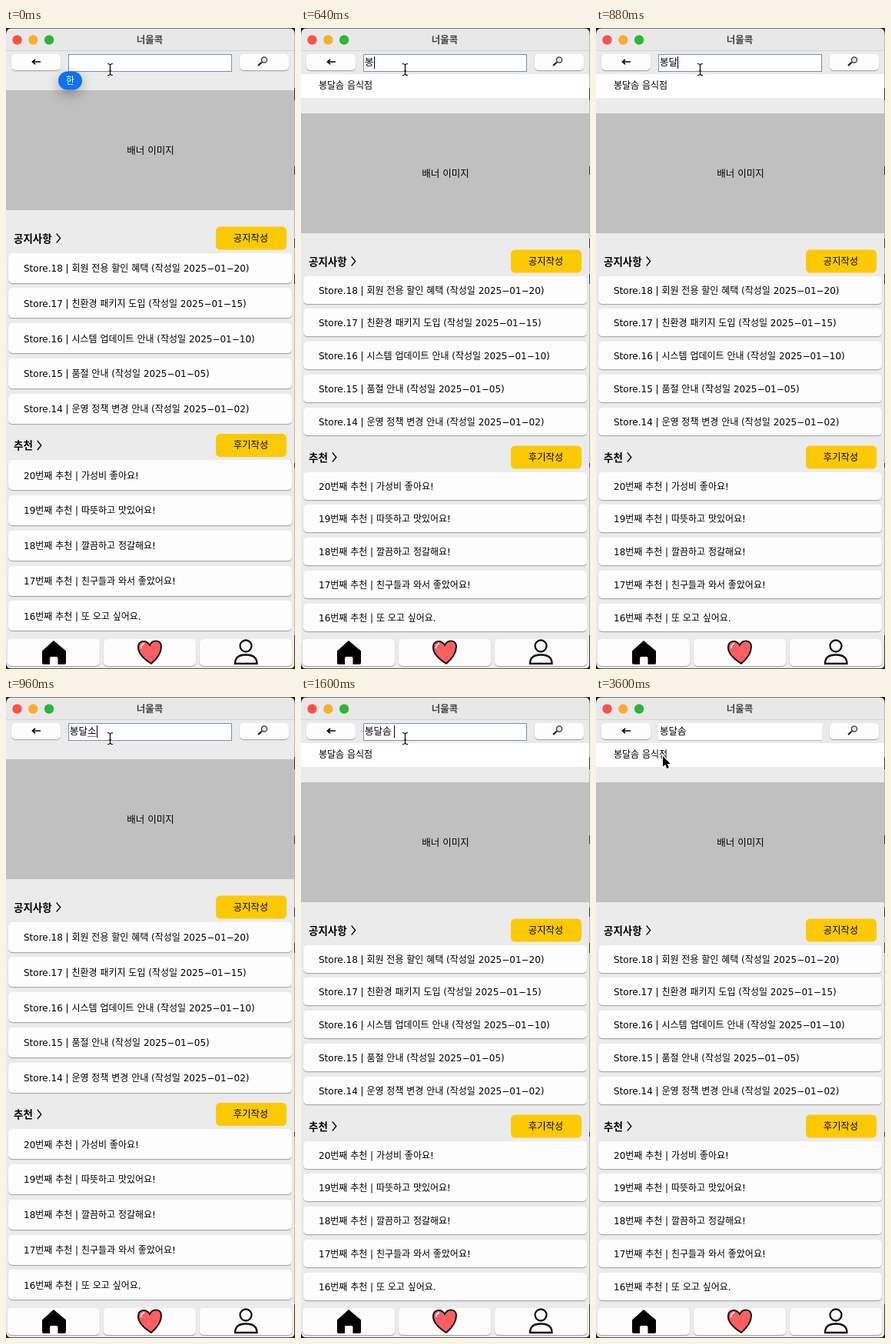
Write an HTML page with a canvas that moves like this. It is 376 px wide and 834 px high and loops after 3.68 s.

```html
<!DOCTYPE html>
<html lang="ko">
<head>
<meta charset="utf-8">
<title>너울콕</title>
<style>
  html, body { margin: 0; width: 100%; height: 100%; overflow: hidden; background: #ebebeb; }
  canvas { display: block; width: 376px; height: 834px; }
</style>
</head>
<body>
<canvas id="stage" width="376" height="834"></canvas>
<script>
const ctx = document.getElementById("stage").getContext("2d");
const W = 376, H = 834, LOOP = 3680, STEP = 80;
const FONT = '"DejaVu Sans", "Noto Sans CJK KR", "Noto Sans CJK", sans-serif';
const KOREAN = '"Noto Sans CJK KR", "Noto Sans CJK", sans-serif';

const VENUE = "봉달솜 음식점";
const KEYS = [
  [400, "ㅂ"], [480, "보"], [560, "봉"],
  [720, "봉ㄷ"], [800, "봉다"], [880, "봉달"],
  [960, "봉달소"], [1040, "봉달솜"], [1200, "봉달솜 "]
];
const NOTICES = [
  ["회원 전용 할인 혜택", 20], ["친환경 패키지 도입", 15], ["시스템 업데이트 안내", 10],
  ["품절 안내", 5], ["운영 정책 변경 안내", 2]
].map(([name, day], i) =>
  `Store.${18 - i} | ${name} (작성일 2025−01−${String(day).padStart(2, "0")})`);
const REVIEWS = ["가성비 좋아요!", "따뜻하고 맛있어요!", "깔끔하고 정갈해요!",
  "친구들과 와서 좋았어요!", "또 오고 싶어요."].map((s, i) => `${20 - i}번째 추천 | ${s}`);

const FOCUS_LOST = 3440, MOVE_START = 2800, MOVE_END = 3360;

function text(str, x, y, size = 12, { color = "#000", weight = 400, align = "left", family = FONT } = {}) {
  ctx.font = `${weight} ${size}px ${family}`;
  ctx.fillStyle = color;
  ctx.textAlign = align;
  ctx.fillText(str, x, y);
}

function rect(x, y, w, h, color) {
  ctx.fillStyle = color;
  ctx.fillRect(x, y, w, h);
}

function round(x, y, w, h, r, color) {
  ctx.beginPath();
  ctx.roundRect(x, y, w, h, r);
  ctx.fillStyle = color;
  ctx.fill();
}

function disc(x, y, r, color) {
  ctx.beginPath();
  ctx.arc(x, y, r, 0, Math.PI * 2);
  ctx.fillStyle = color;
  ctx.fill();
}

function stroke(d, color, width) {
  ctx.strokeStyle = color;
  ctx.lineWidth = width;
  ctx.stroke(new Path2D(d));
}

function fill(d, color) {
  ctx.fillStyle = color;
  ctx.fill(new Path2D(d));
}

function card(x, y, w, h) {
  round(x - 0.5, y, w + 1, h + 1.5, 6, "rgba(0,0,0,.1)");
  round(x, y + 0.5, w, h + 0.5, 5.5, "rgba(0,0,0,.2)");
  round(x, y, w, h, 5, "#fdfdfd");
}

function titleBar() {
  rect(0, 0, W, 29, "#e9e8e8");
  rect(0, 29, W, 1, "#d3d3d3");
  ["#fd5149", "#f9ae2c", "#2ab735"].forEach((c, i) => disc(14.5 + i * 20.8, 15.5, 6.2, c));
  text("너울콕", 187, 19.5, 12.5, { color: "#454545", weight: 700, align: "center", family: KOREAN });
}

function toolbar() {
  card(7, 34, 64, 21);
  stroke("M45 44H34.5M38 40.8L34.5 44L38 47.2", "#000", 1.7);
  card(304, 34, 64, 21);
  stroke("M333 44.5L328 48.8", "#222", 2.2);
  disc(336, 41.5, 3.6, "#dfe3e6");
  stroke("M339.6 41.5a3.6 3.6 0 1 1-7.2 0a3.6 3.6 0 1 1 7.2 0", "#333", 1.2);
}

function field(typed, focused, caret, composing) {
  rect(81, 34, 213, 23, "#fff");
  if (focused) {
    ctx.strokeStyle = "#7891a8";
    ctx.lineWidth = 1;
    ctx.strokeRect(81.5, 34.5, 212, 22);
  } else {
    rect(81, 56, 213, 1, "#bdbdbd");
  }
  text(typed, 83, 49, 12.5);
  const end = 83 + ctx.measureText(typed).width;
  if (composing) rect(end - 11.5, 51, 11, 1, "#777");
  if (caret) rect(Math.round(end), 37, 1, 16, "#000");
}

function section(title, y, items, firstRow, pitch, button) {
  text(title, 10, y + 5, 13.5, { weight: 700, family: KOREAN });
  const x = 16 + ctx.measureText(title).width;
  stroke(`M${x} ${y - 6}L${x + 5} ${y}L${x} ${y + 6}`, "#000", 1.3);
  round(273, y - 15, 92, 30, 5.5, "#fdc903");
  text(button, 318.5, y + 4, 12.3, { align: "center", family: KOREAN });
  items.forEach((item, i) => {
    const mid = firstRow + i * pitch;
    const h = pitch - 7, top = Math.round(mid - h / 2);
    card(3, top, 369, Math.round(h));
    text(item, 23, Math.round(mid) + 4.5);
  });
}

function content(open) {
  if (open) {
    rect(0, 60, W, 31, "#fff");
    text(VENUE, 23, 78.5);
  }
  const top = open ? 111 : 81;
  rect(0, top, W, 156, "#c0c0c0");
  text("배너 이미지", 188, top + 83, 12.5, { align: "center" });
  const pitch = open ? 42.75 : 45.8;
  section("공지사항", open ? 303.5 : 273.5, NOTICES, open ? 340.5 : 312, pitch, "공지작성");
  section("추천", open ? 558.5 : 543, REVIEWS, open ? 595.5 : 581.5, pitch, "후기작성");
}

function tabs() {
  [2, 127, 252].forEach(x => card(x, 795, 120, 35));
  fill("M62 797L78 810.5V826Q78 828 76 828H67.5V820Q67.5 818 65.5 818H59Q57 818 57 820V828H49Q47 828 47 826V810.5Z", "#000");
  const heart = "M189 827C181 822 172 814 172 806C172 797 182 795 187 803C191 795 202 796 202 805C202 814 196 821 189 827Z";
  fill(heart, "#fc5e62");
  stroke(heart, "#141414", 2);
  stroke("M176 807Q175.5 802 180 801", "#fff", 1.6);
  stroke("M319.5 804a7.5 7.5 0 1 1-15 0a7.5 7.5 0 1 1 15 0M298 827C298 819 303 815.5 312 815.5S326.5 819 326.5 827Z", "#111", 2.3);
}

function frameEdge() {
  rect(375, 0, 1, H, "#b5b5b5");
  [[78, 16], [180, 11], [274, 12], [320, 13], [566, 6], [790, 44]].forEach(([y, h]) => rect(375, y, 1, h, "#333"));
  rect(0, 0, W, 1, "#777");
  rect(0, 833, W, 1, "#555");
  fill("M0 0H9Q0 0 0 9ZM376 0V9Q376 0 367 0ZM0 834V825Q0 834 9 834ZM376 834H367Q376 834 376 825Z", "#222");
}

function inputBadge() {
  ctx.save();
  ctx.shadowColor = "rgba(0,0,0,.3)";
  ctx.shadowBlur = 16;
  ctx.shadowOffsetY = 6;
  round(68, 56.5, 31, 24, 12, "#0a72fb");
  ctx.restore();
  text("한", 83.5, 73, 12, { color: "#fff", align: "center", family: KOREAN });
}

function pointer(t) {
  const p = Math.min(1, Math.max(0, (t - MOVE_START) / (MOVE_END - MOVE_START)));
  const e = p * p * (3 - 2 * p);
  const x = 135.5 - 48.5 * e, y = 54 + 23 * e;
  ctx.save();
  ctx.translate(x, y);
  if (y < 58) {
    const beam = "M-3.5 -7.5Q0 -7.5 0 -5Q0 -7.5 3.5 -7.5M0 -5V5M-3.5 7.5Q0 7.5 0 5Q0 7.5 3.5 7.5M-2 2H2";
    stroke(beam, "rgba(255,255,255,.8)", 2.8);
    stroke(beam, "#000", 1.2);
  } else {
    const arrow = "M0 0V13.5L3 10.8L5.2 16L7.8 15L5.6 10H9.8Z";
    stroke(arrow, "#fff", 2);
    fill(arrow, "#000");
  }
  ctx.restore();
}

function draw(now) {
  const t = Math.floor((now % LOOP) / STEP) * STEP;
  const key = KEYS.filter(k => k[0] <= t).pop() || [240, ""];
  const focused = t < FOCUS_LOST;
  const typed = key[1];
  const open = typed !== "" && VENUE.startsWith(typed);
  const caret = focused && t >= key[0] && Math.floor((t - key[0]) / 500) % 2 === 0;

  rect(0, 0, W, H, "#ebebeb");
  titleBar();
  toolbar();
  field(typed, focused, caret, typed !== "" && !open);
  content(open);
  tabs();
  frameEdge();
  if (!typed) inputBadge();
  pointer(t);
}

const start = performance.now();
function tick() {
  draw(performance.now() - start);
  requestAnimationFrame(tick);
}
tick();
</script>
</body>
</html>
```
